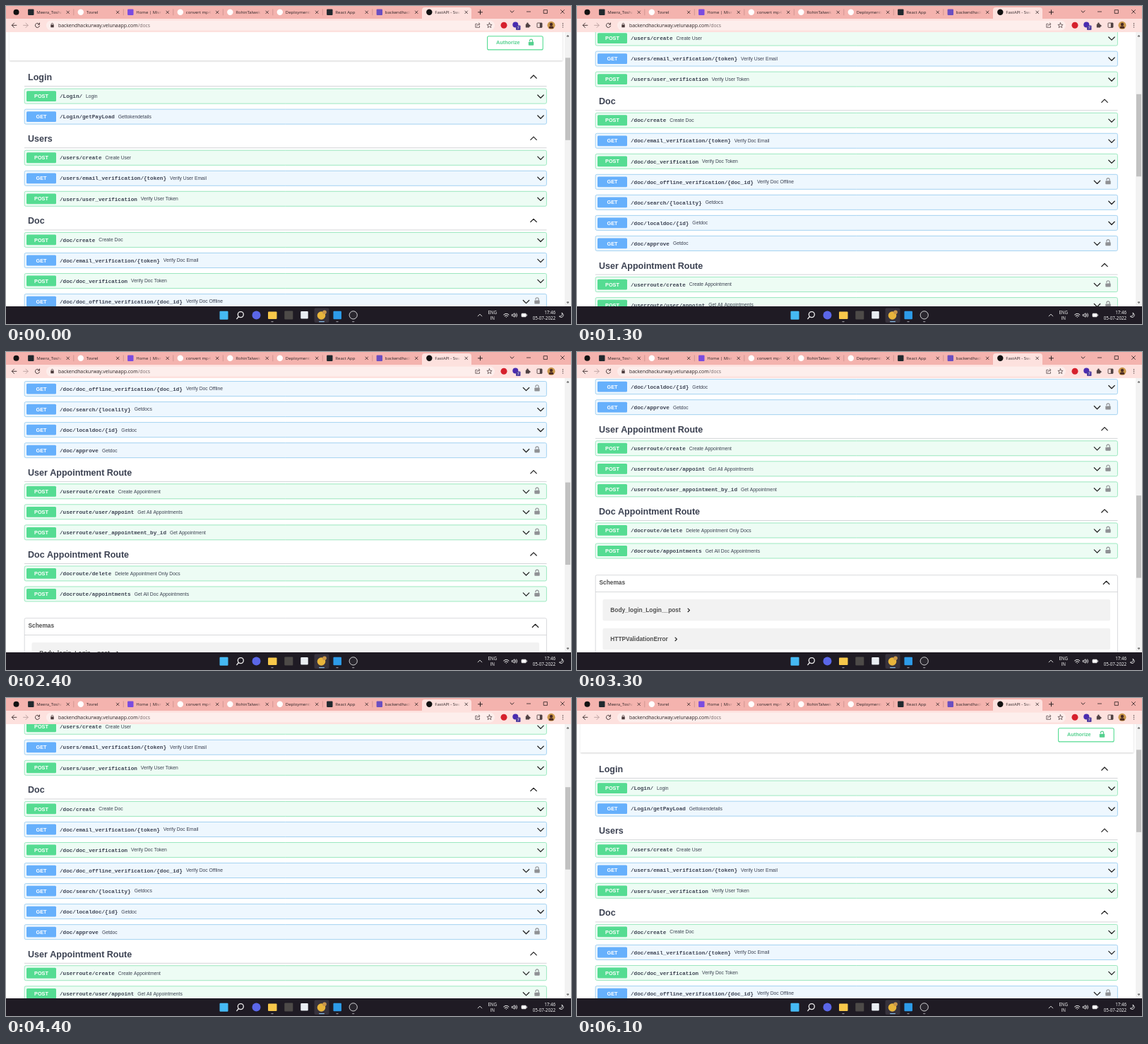
Animation of 800 by 450 pixels, one loop 6200 ms. Source, as an HTML page with a canvas:

```html
<!DOCTYPE html>
<html lang="en">
<head>
<meta charset="utf-8">
<title>API docs scroll</title>
<style>
html, body { margin: 0; width: 100%; height: 100%; overflow: hidden; background: #fff; }
canvas { display: block; }
</style>
</head>
<body>
<canvas id="stage" width="800" height="450"></canvas>
<script>
const ctx = document.getElementById('stage').getContext('2d');
const LOOP = 6200, STEP = 100;
const SANS = '"Liberation Sans", Arial, sans-serif';
const MONO = '"Liberation Mono", monospace';
const UI = '"Open Sans", sans-serif';
const INK = '#3b4151', PAGE_TOP = 37, PAGE_BOTTOM = 425;
const METHOD = {
  POST: { badge: '#55dc92', fill: '#edfcf4', edge: '#86e3b2' },
  GET: { badge: '#66b0fc', fill: '#eef7fe', edge: '#90c8ee' },
};

// "*" marks an operation with a padlock
const SECTIONS = [
  ['Login', 'POST|/Login/|Login', 'GET|/Login/getPayLoad|Gettokendetails'],
  ['Users', 'POST|/users/create|Create User',
    'GET|/users/email_verification/{token}|Verify User Email',
    'POST|/users/user_verification|Verify User Token'],
  ['Doc', 'POST|/doc/create|Create Doc',
    'GET|/doc/email_verification/{token}|Verify Doc Email',
    'POST|/doc/doc_verification|Verify Doc Token',
    'GET|/doc/doc_offline_verification/{doc_id}|Verify Doc Offline|*',
    'GET|/doc/search/{locality}|Getdocs', 'GET|/doc/localdoc/{id}|Getdoc',
    'GET|/doc/approve|Getdoc|*'],
  ['User Appointment Route', 'POST|/userroute/create|Create Appointment|*',
    'POST|/userroute/user/appoint|Get All Appointments|*',
    'POST|/userroute/user_appointment_by_id|Get Appointment|*'],
  ['Doc Appointment Route', 'POST|/docroute/delete|Delete Appointment Only Docs|*',
    'POST|/docroute/appointments|Get All Doc Appointments|*'],
];
const SCHEMAS = ['Body_login_Login__post', 'HTTPValidationError', 'ValidationError'];

// [time, scroll offset]: bursts of wheel ticks, 52px each
const SCROLL = [
  [0, 0], [100, 8], [200, 44], [300, 52], [900, 52], [1000, 54], [1500, 246], [1600, 260],
  [2100, 260], [2200, 276], [2600, 456], [2700, 468], [3200, 468], [3300, 427], [3700, 267],
  [3800, 260], [4200, 260], [4300, 225], [4400, 174], [4700, 110], [4800, 104],
  [5000, 104], [5100, 100], [5200, 80], [5300, 22], [5400, 0], [LOOP, 0],
];

const TABS = [
  ['Meera_Toshan', '#20292e'], ['Tovrel', '#fff', 1], ['Home | Mivronel', '#7a4be0'],
  ['convert mp4 to gif', '#fff', 1], ['RohinTalwekar', '#fff', 1], ['Deployments', '#fff', 1],
  ['React App', '#20292e'], ['backendhackurway', '#6b4fc0'], ['FastAPI - Swagger UI', '#111', 1],
];

function scrollAt(t) {
  const i = SCROLL.findIndex(k => k[0] > t);
  const [t0, s0] = SCROLL[i - 1], [t1, s1] = SCROLL[i];
  return s0 + (s1 - s0) * (t - t0) / (t1 - t0);
}

function text(str, x, y, font, color = INK, align = 'left') {
  ctx.font = font;
  ctx.fillStyle = color;
  ctx.textAlign = align;
  ctx.textBaseline = 'alphabetic';
  ctx.fillText(str, x, y);
  return ctx.measureText(str).width;
}

function box(x, y, w, h, r, fill, edge, lineWidth = 0.8) {
  ctx.beginPath();
  ctx.roundRect(x, y, w, h, r);
  if (fill) { ctx.fillStyle = fill; ctx.fill(); }
  if (edge) { ctx.strokeStyle = edge; ctx.lineWidth = lineWidth; ctx.stroke(); }
}

function dot(x, y, r, fill, edge, lineWidth) {
  box(x - r, y - r, 2 * r, 2 * r, r, fill, edge, lineWidth);
}

function square(x, y, size, fill) {
  box(x - size / 2, y - size / 2, size, size, 1, fill);
}

function line(x, y, d, color = '#222', width = 1) {
  ctx.save();
  ctx.translate(x, y);
  ctx.strokeStyle = color;
  ctx.lineWidth = width;
  ctx.lineCap = ctx.lineJoin = 'round';
  ctx.stroke(new Path2D(d));
  ctx.restore();
}

const chevronDown = (x, y) => line(x, y, 'M-4.2-2 L0 2.2 L4.2-2', '#222', 1.25);
const chevronUp = (x, y) => line(x, y, 'M-4.2 2 L0-2.2 L4.2 2', '#222', 1.25);

function padlock(x, y, color) {
  box(x - 3.7, y - 0.8, 7.4, 5, 0.8, color);
  line(x, y, 'M-2.1-2 V-2.4 A2.1 2.1 0 0 1 2.1-2.4 V-.5', color, 1.2);
}

function operation(spec, y) {
  const [method, path, summary, locked] = spec.split('|');
  const { badge, fill, edge } = METHOD[method];
  box(26.2, y - 10.5, 739.2, 21, 2, fill, edge);
  box(29, y - 7.4, 42, 14.8, 1.5, badge);
  text(method, 50, y + 2.6, `bold 7.3px ${SANS}`, '#fff', 'center');
  const width = text(path, 76, y + 2.7, `bold 7.64px ${MONO}`);
  text(summary, 76 + width + 5, y + 2.4, `6.77px ${SANS}`);
  chevronDown(locked ? 736.5 : 757, y + 0.4);
  if (locked) padlock(752, y - 0.8, '#8f9194');
}

function drawPage(scroll) {
  ctx.save();
  ctx.beginPath();
  ctx.rect(0, PAGE_TOP, 800, PAGE_BOTTOM - PAGE_TOP);
  ctx.clip();
  ctx.fillStyle = '#fff';
  ctx.fillRect(0, PAGE_TOP, 800, 400);
  ctx.translate(0, -scroll);

  ctx.save();
  ctx.shadowColor = 'rgba(0,0,0,.22)';
  ctx.shadowBlur = 2;
  ctx.shadowOffsetY = 0.6;
  box(4.5, -60, 783.5, 137.3, 0, '#fff');
  ctx.restore();
  box(681.6, 42.7, 78.6, 19.2, 2, '#fff', '#55dc92', 1.1);
  text('Authorize', 694, 54.2, `bold 7.3px ${SANS}`, '#55d08f');
  padlock(743.5, 51.6, '#55d08f');

  let y = 100.5;
  for (const [title, ...operations] of SECTIONS) {
    text(title, 31, y + 4.6, `bold 12.5px ${SANS}`);
    chevronUp(747, y - 0.3);
    ctx.fillStyle = '#c9cbcf';
    ctx.fillRect(26, y + 12.7, 739.5, 0.8);
    y += 27.1;
    for (const spec of operations) {
      operation(spec, y);
      y += 29.03;
    }
    y += 2;
  }

  box(26.2, 742.7, 739.2, 180, 2, null, '#cfd0d3');
  text('Schemas', 31.5, 755.8, `bold 8.33px ${SANS}`, '#505050');
  chevronUp(749.5, 753.5);
  ctx.fillStyle = '#cfd0d3';
  ctx.fillRect(26, 766, 739.5, 0.8);
  SCHEMAS.forEach((name, i) => {
    const top = 777 + 41 * i;
    box(36.5, top, 718.5, 30.3, 2, '#f2f2f2');
    const width = text(name, 47.3, top + 18, `bold 8.33px ${SANS}`, '#505050');
    line(47.3 + width + 11.5, top + 15.4, 'M-1.2-2.3 L1.2 0 L-1.2 2.3', '#222', 1.2);
  });
  ctx.restore();

  ctx.fillStyle = '#f2f2f2';
  ctx.fillRect(791, PAGE_TOP, 9, PAGE_BOTTOM - PAGE_TOP);
  ctx.fillStyle = '#c1c1c1';
  ctx.fillRect(792, 73.3 + 0.304 * scroll, 7, 116.5);
  line(795.5, 42, 'M-1.2.7 L0-.7 L1.2.7 Z', '#555');
  line(795.5, 420, 'M-1.2-.7 L0 .7 L1.2-.7 Z', '#555');
}

function drawTabs() {
  ctx.fillStyle = '#f4b3ae';
  ctx.fillRect(0, 0, 800, 18);
  box(589, 2, 70, 17, [4, 4, 0, 0], '#fde1de');
  dot(14.5, 8.7, 4, '#111');
  TABS.forEach(([title, color, round], i) => {
    const x = 35.3 + 70.5 * i;
    if (round) dot(x, 8.7, 4.2, color); else square(x, 8.7, 8.4, color);
    ctx.save();
    ctx.beginPath();
    ctx.rect(x + 8, 0, 36, 18);
    ctx.clip();
    const fade = ctx.createLinearGradient(x + 36, 0, x + 44, 0);
    fade.addColorStop(0, '#2c2224');
    fade.addColorStop(1, 'rgba(44,34,36,0)');
    text(title, x + 8, 10.9, `6px ${UI}`, fade);
    ctx.restore();
    line(x + 52.4, 8.8, 'M-1.8-1.8 L1.8 1.8 M1.8-1.8 L-1.8 1.8', '#2c2224', 0.8);
    if (i < 7) line(x + 60.5, 8.8, 'M0-4 V4', '#b98380', 0.6);
  });
  line(671.5, 8.8, 'M-3 0 H3 M0-3 V3', '#2c2224');
  line(716.5, 8, 'M-2.4-1.2 L0 1.2 L2.4-1.2', '#2c2224');
  line(740, 8, 'M-2.6 0 H2.6', '#2c2224', 0.8);
  line(764, 8, 'M-2.4-2.4 H2.4 V2.4 H-2.4 Z', '#2c2224', 0.8);
  line(788, 8, 'M-2.5-2.5 L2.5 2.5 M2.5-2.5 L-2.5 2.5', '#2c2224', 0.8);
}

function drawToolbar() {
  ctx.fillStyle = '#fde1de';
  ctx.fillRect(0, 18, 800, 19);
  box(57, 20.5, 635, 14, 7, '#fdeeec');
  line(11.5, 27.3, 'M3.4 0 H-3.2 M0-3.2 L-3.2 0 L0 3.2', '#4a3a3b');
  line(28, 27.3, 'M-3.4 0 H3.2 M0-3.2 L3.2 0 L0 3.2', '#c0a5a4');
  line(44.5, 27.3, 'M2.6-1.6 A3.1 3.1 0 1 0 3 .9 M3-3.3 V-1.1 H.8', '#4a3a3b');
  box(63.3, 26.6, 4.4, 3.6, 0.5, '#4a3a3b');
  line(65.5, 27, 'M-1.3 0 V-1.3 A1.3 1.3 0 0 1 1.3-1.3 V0', '#4a3a3b', 0.8);
  const width = text('backendhackurway.velunaapp.com', 74, 29.7, `6.9px ${UI}`, '#2b2324');
  text('/docs', 74 + width, 29.7, `6.9px ${UI}`, '#75686a');

  line(668, 27.3, 'M-1-2 H-3.2 V3 H2.5 V1 M-1.4 1 Q-1-1.8 2.8-1.8 M1.3-3.4 L3-1.8 L1.3-.2', '#5a4b4c', 0.8);
  line(684.5, 27.4, 'M0-3.6 L1-1.1 L3.6-1 L1.6.7 L2.3 3.2 L0 1.8 L-2.3 3.2 L-1.6.7 L-3.6-1 L-1-1.1 Z', '#5a4b4c', 0.8);
  dot(705, 27.3, 4.5, '#d6202c');
  dot(721.3, 26.6, 4, '#4a2bb0');
  box(722, 27.5, 6.5, 6.5, 1, '#4d3c9e');
  text('7', 725.3, 32.8, `5px ${UI}`, '#fff', 'center');
  box(735.8, 25.4, 5.2, 5.2, 0.6, '#4f4142');
  dot(738.4, 24.9, 1.3, '#4f4142');
  dot(741.3, 28, 1.3, '#4f4142');
  box(752, 24, 7, 6.4, 0.6, null, '#4f4142', 0.9);
  ctx.fillStyle = '#4f4142';
  ctx.fillRect(755.8, 24, 3.2, 6.4);
  dot(772, 27.3, 5.5, '#c9964a');
  dot(772, 26, 2.2, '#4b2a22');
  box(768.8, 28.6, 6.4, 3.2, [2, 2, 1, 1], '#4b2a22');
  for (const dy of [-2.6, 0, 2.6]) dot(788.5, 27.3 + dy, 0.7, '#4f4142');
}

function drawTaskbar() {
  ctx.fillStyle = '#1f1b24';
  ctx.fillRect(0, PAGE_BOTTOM, 800, 25);
  square(308.5, 437.7, 12, '#45b9f3');
  dot(332.3, 436.6, 4, null, '#eee', 1.3);
  line(328, 441, 'M1.2-1.2 L-1.2 1.6', '#eee', 1.4);
  dot(354.5, 437.6, 6, '#5b67e8');
  box(371, 432.5, 12.5, 10.5, 1, '#f7c84a');
  square(400.3, 437.6, 12, '#4d4a48');
  square(422.5, 437.2, 10.5, '#e9edf2');
  box(436.5, 427.5, 21, 20.5, 2, '#37323c');
  dot(446.5, 438, 5.8, '#e8b53c');
  dot(451, 433.3, 2.8, '#c9964a');
  square(469.2, 437.4, 11.5, '#2d9be8');
  dot(491.7, 437.4, 5.6, '#29262e', '#d8d8da', 1);
  for (const x of [377, 469, 491.7]) box(x - 1.7, 446, 3.4, 1.2, 0.6, '#8d8a92');
  box(443, 446, 8, 1.2, 0.6, '#7fb4e0');

  line(671, 437.5, 'M-2.8 1.4 L0-1.4 L2.8 1.4', '#eee', 0.9);
  const small = `6.2px ${UI}`;
  text('ENG', 688.7, 435.8, small, '#fff', 'center');
  text('IN', 688.7, 444.2, small, '#fff', 'center');
  line(708.3, 438.5, 'M-3.6-1.6 Q0-4.8 3.6-1.6 M-2.2.2 Q0-1.7 2.2.2 M0 2 V2.1', '#fff', 1);
  line(720, 437.5, 'M-3.4-1 H-2 L0-2.8 V2.8 L-2 1 H-3.4 Z M1.5-1.4 Q2.5 0 1.5 1.4 M2.9-2.6 Q4.8 0 2.9 2.6', '#fff', 0.8);
  box(730, 435.2, 6.3, 4.6, 0.8, '#fff', '#fff', 0.7);
  line(737.6, 437.5, 'M0-.7 V.7', '#fff', 0.8);
  text('17:46', 778, 435.8, small, '#fff', 'right');
  text('05-07-2022', 778, 444.2, small, '#fff', 'right');
  line(786.3, 437.6, 'M1-3.2 A3.2 3.2 0 1 1-3 1.4 A3.4 3.4 0 0 0 1-3.2 Z', '#fff', 0.8);
}

function frame(now) {
  const t = Math.floor(now % LOOP / STEP) * STEP;
  drawPage(scrollAt(t));
  drawTabs();
  drawToolbar();
  drawTaskbar();
  requestAnimationFrame(frame);
}
requestAnimationFrame(frame);
</script>
</body>
</html>
```
